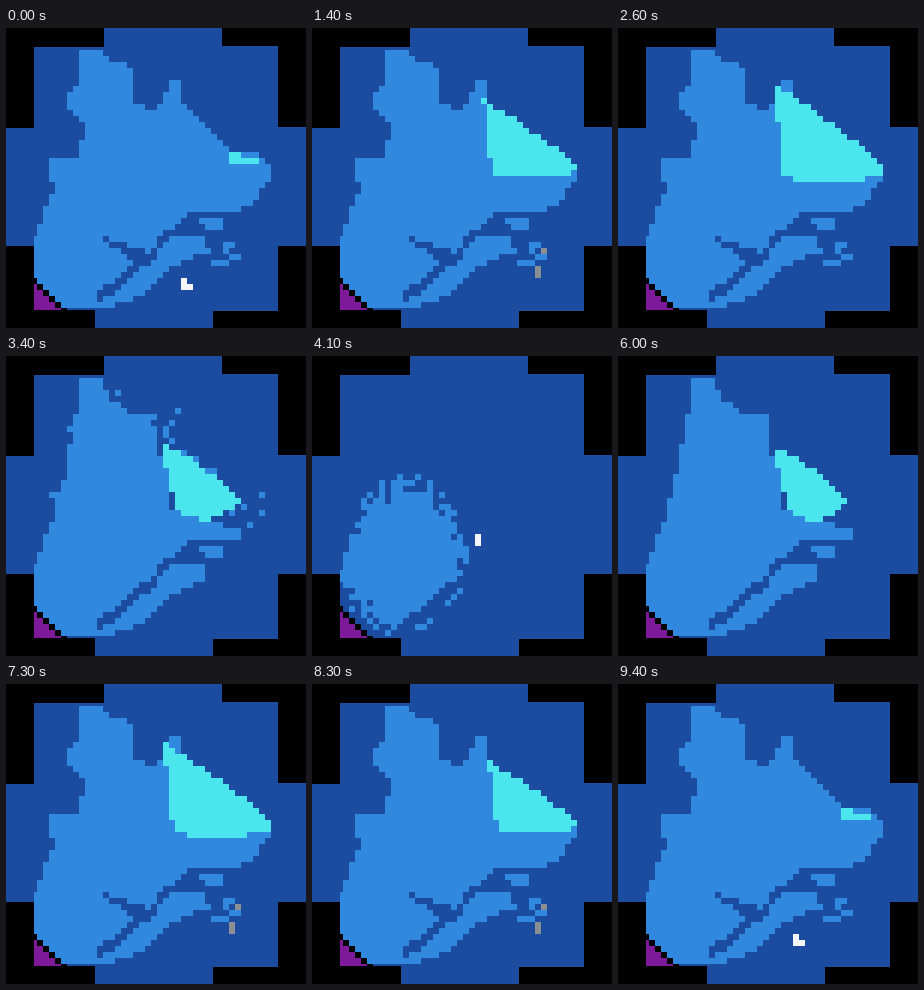
Write an HTML page with a canvas that moves like this. It is 300 px wide and 300 px high and loops after 9.5 s.

```html
<!DOCTYPE html>
<html lang="en">
<head>
<meta charset="utf-8">
<title>Pixel map</title>
<style>
  html, body { margin: 0; width: 100%; height: 100%; overflow: hidden; background: #000; }
  canvas { display: block; width: 300px; height: 300px; }
</style>
</head>
<body>
<canvas id="stage" width="300" height="300"></canvas>
<script>
const ctx = document.getElementById("stage").getContext("2d");
const LOOP = 9500, STEP = 100, LAST = 44;
const CELL = 6, LEFT = 25, TOP = 16, COLS = 42, ROWS = 45;
const SEA = "#1b4c9f", LAND = "#3088df", ICE = "#4be5ee";
const PURPLE = "#7e1a9a", GRAY = "#8a8f96", WHITE = "#f4f6fa", BLACK = "#000";

const seaArea = new Path2D(
  "M28 19H98V0H216V18H272V99H300V218H272V283H207V300H89V282H28V218H0V100H28Z");
const board = new Path2D("M28 18H272V282H28Z");

const SOUTH = "L182 187 151 212 147 222 168 209 199 208 199 222 160 244 133 268 97 281H28V208L48 163";
const lateLand = new Path2D(
  "M73 22H97L104 34H115L127 46V80L133 76 139 82H151L163 58 169 52H175V70L187 84 210 108 228 124" +
  "H250L266 139 265 150 242 180" + SOUTH + "L42 130 70 128 78 106 79 94 61 78V64L73 54Z");
const earlyLand = new Path2D(
  "M73 22H97L103 46H115L121 58H151V97L163 110V150L235 175V184" + SOUTH + "L54 130 61 106 67 70 73 46Z");
const island = new Path2D("M193 190H211L217 196V202H199Z");
const river = new Path2D("M92 272L104 261 122 247 150 222");
const inlet = new Path2D("M100 211L107 217 118 219 121 226 136 226");

// The ice is a wedge between three points: start, tip and base.
const smallIce = { start: [222, 123], tip: [266, 138], base: [226, 138], bulge: 0 };
const fullIce = { start: [156, 57], tip: [271, 143], base: [166, 148], bulge: 18 };
const patchIce = { start: [153, 91], tip: [230, 145], base: [172, 155], bulge: 28 };
const noIce = { start: [190, 130], tip: [190, 130], base: [190, 130], bulge: 0 };

const mix = (a, b, k) => Array.isArray(a) ? a.map((v, i) => mix(v, b[i], k)) : a + (b - a) * k;
const easeOut = k => 1 - (1 - k) ** 2;

function mixPose(a, b, k) {
  return Object.fromEntries(Object.keys(a).map(key => [key, mix(a[key], b[key], k)]));
}

function icePose(s) {
  if (s < 25) return mixPose(smallIce, fullIce, easeOut(s / 25));
  if (s < 34) return mixPose(fullIce, patchIce, (s - 25) / 9);
  return mixPose(patchIce, noIce, Math.min(1, (s - 34) / 4));
}

function iceShape(s) {
  const { start, tip, base, bulge } = icePose(s);
  const path = new Path2D();
  const top = mix(start, tip, 0.5), bottom = mix(tip, base, 0.5);
  path.moveTo(...start);
  path.quadraticCurveTo(top[0], top[1] - bulge / 2, ...tip);
  path.quadraticCurveTo(bottom[0], bottom[1] + bulge, ...base);
  path.closePath();
  return path;
}

function noise(col, row) {
  const v = Math.sin(col * 127.1 + row * 311.7) * 43758.5453;
  return v - Math.floor(v);
}

function paintCell(color, col, row, cols = 1, rows = 1) {
  ctx.fillStyle = color;
  ctx.fillRect(LEFT + col * CELL, TOP + row * CELL, cols * CELL, rows * CELL);
}

function onLine(path, width, x, y) {
  ctx.lineWidth = width;
  return ctx.isPointInStroke(path, x, y);
}

function isLand(s, x, y, n) {
  const inside = path => ctx.isPointInPath(path, x, y);
  if (s < 37 && inside(island)) return true;
  if (s < 26 && n < 0.3 && Math.hypot(x - 220, (y - 226) * 1.5) < 20) return true;
  if (onLine(river, 9, x, y)) return false;
  if (s < 29 && onLine(inlet, 7, x, y)) return false;
  if (s < 34 - 9 * n) return inside(lateLand);
  if (!inside(earlyLand)) return false;
  if (s <= 34) return true;
  const radius = 66 + (40 - s) * (s < 40 ? 20 : 15);
  return Math.hypot(x - 90, (y - 200) / 1.25) + 26 * n * n < radius;
}

function drawDoodles(s) {
  if (s < 7) {
    paintCell(WHITE, 25, 39, 1, 2);
    paintCell(WHITE, 26, 40);
  } else if (s > 9 && s < 24) {
    paintCell(GRAY, 33, 37, 1, 2);
    paintCell(GRAY, 34, 34);
  } else if (s > 38 && s < 42) {
    paintCell(WHITE, 23, 27, 1, 2);
  }
}

function drawCorner() {
  for (let i = 0; i < 6; i++) {
    paintCell(PURPLE, i, 40 + i, 1, 5);
    paintCell(BLACK, i, 39 + i);
  }
}

function draw(s) {
  ctx.fillStyle = BLACK;
  ctx.fillRect(0, 0, 300, 300);
  ctx.fillStyle = SEA;
  ctx.fill(seaArea);

  ctx.save();
  ctx.clip(board);
  const ice = iceShape(s);
  for (let row = 0; row < ROWS; row++) {
    for (let col = 0; col < COLS; col++) {
      const x = LEFT + (col + 0.5) * CELL, y = TOP + (row + 0.5) * CELL;
      if (ctx.isPointInPath(ice, x, y)) paintCell(ICE, col, row);
      else if (isLand(s, x, y, noise(col, row))) paintCell(LAND, col, row);
    }
  }
  drawDoodles(s);
  drawCorner();
  ctx.restore();
}

// The map dissolves, rests, then rebuilds.
function stateAt(t) {
  const tick = Math.floor(t / STEP);
  const s = tick < 50 ? tick - 1 : LAST - (tick - 50);
  return Math.max(0, Math.min(LAST, s));
}

let shown = -1;
function frame() {
  const s = stateAt(performance.now() % LOOP);
  if (s !== shown) draw(shown = s);
  requestAnimationFrame(frame);
}
frame();
</script>
</body>
</html>
```
